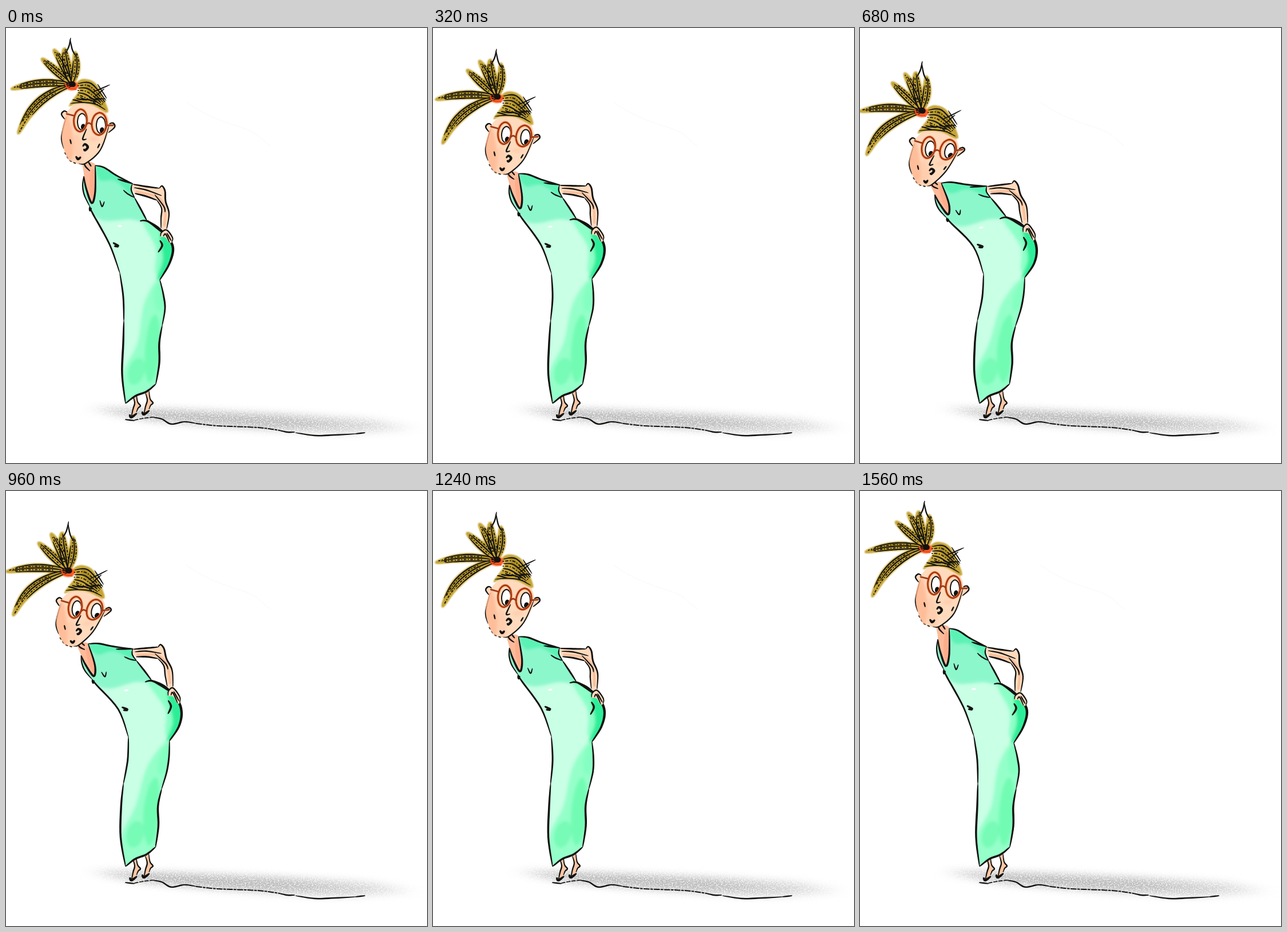
Write an HTML page that moves like this. It is 736 by 760 pixels and loops after 1.6 s.

```html
<!DOCTYPE html>
<html lang="en">
<head>
<meta charset="utf-8">
<title>Looking back</title>
<style>
html, body { margin: 0; width: 100%; height: 100%; overflow: hidden; background: #fff; }
svg { display: block; width: 100vw; height: 100vh; }
</style>
</head>
<body>
<svg viewBox="0 0 736 760" xmlns="http://www.w3.org/2000/svg">
  <defs>
    <filter id="grain" x="100" y="620" width="636" height="140" filterUnits="userSpaceOnUse" color-interpolation-filters="sRGB">
      <feGaussianBlur in="SourceGraphic" stdDeviation="16 7" result="soft"/>
      <feTurbulence type="fractalNoise" baseFrequency=".45" numOctaves="3" seed="4"/>
      <feColorMatrix values="0 0 0 0 0  0 0 0 0 0  0 0 0 0 0  2.2 0 0 0 -.3" result="noise"/>
      <feComposite in="soft" in2="noise" operator="in"/>
    </filter>
    <linearGradient id="dusk">
      <stop stop-color="#b2b2b2"/><stop offset=".6" stop-color="#b8b8b8"/><stop offset="1" stop-color="#e6e6e6"/>
    </linearGradient>
    <filter id="wash" x="-30%" y="-30%" width="160%" height="160%"><feGaussianBlur stdDeviation="2.5"/></filter>
    <filter id="tint" x="-30%" y="-30%" width="160%" height="160%"><feGaussianBlur stdDeviation="1"/></filter>
    <clipPath id="dressClip"></clipPath>
    <clipPath id="faceClip"></clipPath>
  </defs>
  <rect width="736" height="760" fill="#fff"/>
  <path d="M315 129C350 155 385 165 415 175S445 195 462 206" fill="none" stroke="#f8f8f8"/>
  <path d="M150 664L300 667L480 675L640 684L715 700L600 708L470 702L350 694L240 684Z" fill="url(#dusk)" filter="url(#grain)"/>
  <g id="ground"></g>
  <g id="legs"></g>
  <g id="neck"></g>
  <g id="dress"></g>
  <g clip-path="url(#dressClip)"><g id="shade" filter="url(#wash)"></g></g>
  <g id="folds"></g>
  <g id="arm"></g>
  <g id="face"></g>
  <g clip-path="url(#faceClip)"><g id="blush" filter="url(#wash)"></g></g>
  <g id="hair" filter="url(#tint)"></g>
  <g id="strands"></g>
  <g id="features"></g>
</svg>
<script>
const NS = 'http://www.w3.org/2000/svg';
const FRAME = 40, COUNT = 40, BLACK = '#131210';
const parts = [];

// x, y, dx, dy: how far key points of the body travel in the bow.
const anchors = [
  [112, 17, -4, 41], [25, 183, -10, 38], [185, 174, -8, 42], [122, 237, -9, 40],
  [155, 240, -14, 31], [135, 260, -5, 32], [214, 269, 0, 7], [274, 277, -3, -9],
  [149, 307, 4, 20], [191, 379, 18, 2], [291, 388, 17, -1], [236, 337, 10, -4],
  [283, 360, 14, -9], [269, 440, 19, -4], [199, 428, 17, 2], [278, 488, 4, 0],
  [206, 512, -1, 0], [203, 585, -4, 0], [265, 605, -1, 0], [209, 655, 0, 0], [255, 670, 0, 0]
];

// A thin-plate spline spreads that travel over every point.
function kernel(ax, ay, bx, by) {
  const q = ((ax - bx) ** 2 + (ay - by) ** 2) / 1e4;
  return q ? q * Math.log(q) : 0;
}
const basis = (x, y) => [...anchors.map(a => kernel(x, y, a[0], a[1])), 1, x / 100, y / 100];
function solve(m) {
  const n = m.length;
  for (let c = 0; c < n; c++) {
    let best = c;
    for (let r = c + 1; r < n; r++) if (Math.abs(m[r][c]) > Math.abs(m[best][c])) best = r;
    [m[c], m[best]] = [m[best], m[c]];
    for (let r = 0; r < n; r++) {
      if (r === c) continue;
      const f = m[r][c] / m[c][c];
      for (let k = c; k < m[r].length; k++) m[r][k] -= f * m[c][k];
    }
  }
  return m.map((row, i) => [row[n] / row[i], row[n + 1] / row[i]]);
}
const bases = anchors.map(a => basis(a[0], a[1]));
const weights = solve([
  ...anchors.map((a, i) => [...bases[i], a[2], a[3]]),
  ...[0, 1, 2].map(k => [...bases.map(b => b[anchors.length + k]), 0, 0, 0, 0, 0])
]);
function shift(x, y) {
  const b = basis(x, y);
  return [0, 1].map(i => b.reduce((sum, v, k) => sum + v * weights[k][i], 0));
}

let seed = 7;
const rand = () => (seed = seed * 16807 % 2147483647) / 2147483647;

// Catmull-Rom samples; a doubled point makes a corner.
function spline(a, b, c, d, t) {
  const bend = 2 * a - 5 * b + 4 * c - d;
  const twist = 3 * (b - c) + d - a;
  return b + .5 * t * (c - a + t * (bend + t * twist));
}
function curve(p, closed) {
  const n = p.length, out = [], last = closed ? n : n - 1, steps = 6;
  const at = i => closed ? p[(i + n) % n] : p[Math.max(0, Math.min(n - 1, i))];
  for (let i = 0; i < last; i++) {
    const [a, b, c, d] = [at(i - 1), at(i), at(i + 1), at(i + 2)];
    if (b[0] === c[0] && b[1] === c[1]) continue;
    for (let k = 0; k < steps; k++) {
      out.push([0, 1].map(j => spline(a[j], b[j], c[j], d[j], k / steps)));
    }
  }
  if (!closed) out.push(p[n - 1]);
  return out;
}
// A pen stroke, thin at both ends.
function brush(p, w) {
  const s = curve(p), n = s.length - 1, left = [], right = [];
  s.forEach(([x, y], i) => {
    const a = s[Math.max(0, i - 1)], b = s[Math.min(n, i + 1)];
    const dx = b[0] - a[0], dy = b[1] - a[1], len = Math.hypot(dx, dy) || 1;
    const h = w / 2 * (.35 + .65 * Math.max(0, Math.sin(Math.PI * i / n)) ** .6);
    left.push([x - dy / len * h, y + dx / len * h]);
    right.unshift([x + dy / len * h, y - dx / len * h]);
  });
  return left.concat(right);
}
const path = (p, end) => 'M' + p.map(q => q[0].toFixed(1) + ' ' + q[1].toFixed(1)).join('L') + end;
const parse = s => typeof s === 'string' ? s.split(' ').map(q => q.split(',').map(Number)) : s;

function add(layer, shape, attrs, build) {
  const el = document.createElementNS(NS, 'path');
  for (const k in attrs) el.setAttribute(k, attrs[k]);
  document.getElementById(layer).append(el);
  const pts = parse(shape);
  const move = pts.map(p => layer === 'ground' ? [0, 0] : shift(...p));
  parts.push({ el, pts, move, build });
}
const outline = p => path(curve(p, true), 'Z');
const fill = (layer, color, shape, opacity = 1) => add(layer, shape, { fill: color, opacity }, outline);
const hoop = (layer, w, color, shape, inside = 'none') =>
  add(layer, shape, { fill: inside, stroke: color, 'stroke-width': w }, outline);
const ink = (layer, w, ...shapes) => shapes.forEach(s =>
  add(layer, s, { fill: BLACK }, p => path(brush(p, w), 'Z')));
const line = (layer, w, color, shape, dash = 'none') =>
  add(layer, shape, { fill: 'none', stroke: color, 'stroke-width': w, 'stroke-dasharray': dash,
    'stroke-linecap': 'round' }, p => path(curve(p), ''));
const offset = (shape, dx, dy) => parse(shape).map(([x, y]) => [x + dx, y + dy]);
function oval(x, y, rx, ry, tilt = 0) {
  const c = Math.cos(tilt), s = Math.sin(tilt);
  return Array.from({ length: 8 }, (_, i) => {
    const u = rx * Math.cos(i * Math.PI / 4), v = ry * Math.sin(i * Math.PI / 4);
    return [x + u * c - v * s, y + u * s + v * c];
  });
}

// Ground line
ink('ground', 2.6, '208,684 225,686', '256,680 272,683 289,692 312,688 333,691', '478,703 492,706 505,706',
  '506,707 540,712 575,711 612,709', '611,709 628,707');
line('ground', 1.7, BLACK, '225,685 240,682 256,680', '6 3');
line('ground', 2, BLACK, '333,691 370,695 440,698 478,703', '9 3 3 3');

const skin = '#ffdabd', tan = '#fdc7a4';

// Legs
for (const [dx, dy] of [[0, 0], [22, -5]]) {
  const back = offset('228,639 230,653 235,660 231,664 228,671', dx, dy);
  const front = offset('219,680 222,666 225,655 222,643', dx, dy);
  fill('legs', tan, [...back, ...front]);
  ink('legs', 2.4, back, front);
  ink('legs', 4.5, offset('216,675 219,680 229,673', dx, dy));
}

// Neck
fill('neck', '#fdbb9a', '134,233 147,234 157,241 158,270 156,298 149,308 140,290 136,255');
fill('neck', '#ff9f7b', oval(152, 272, 6, 26), .5);
ink('neck', 2.6, '136,234 139,242 147,250', '144,234 149,242');

// Dress: the edges join into one outline and are inked one by one.
const shoulder = '156,240 172,244 192,257 221,272', cuff = '221,272 219,283 225,297';
const back = '225,297 236,317 246,336', hip = '246,336 266,349 286,370 292,388 285,413 269,440';
const rear = '269,440 275,465 278,490 273,520', skirt = '273,520 268,550 268,585 262,622';
const hem = '262,622 246,635 226,643 209,656', shin = '209,656 203,605 205,550 206,512';
const thigh = '206,512 205,470 199,428', belly = '199,428 181,378 152,325 146,311';
const strap = '146,311 137,292 134,275 136,259', collar = '136,259 140,280 150,306 156,285 156,240';
const gown = [shoulder, cuff, back, hip, rear, skirt, hem, shin, thigh, belly, strap, collar].join(' ');
fill('dressClip', '#000', gown);
fill('dress', '#c8ffe5', gown);
fill('shade', '#8df7cc', '130,240 190,240 228,280 250,336 215,334 165,335 138,300');
fill('shade', '#4df0ae', '160,238 222,266 226,298 192,268 164,266', .75);
fill('shade', '#86ffc4', '240,336 300,360 290,430 262,430 262,385', .9);
fill('shade', '#1cec90', '270,358 298,370 296,415 264,442 274,404', .85);
fill('shade', '#94ffc9', '268,440 285,490 268,625 205,655 206,600 230,550 242,480');
fill('shade', '#5cfba5', oval(256, 560, 13, 60, .08), .6);
fill('shade', '#5cf7a4', oval(228, 600, 14, 24, .3), .5);
fill('shade', '#7cffbd', oval(268, 470, 10, 26), .6);
fill('folds', '#f7fffb', oval(199, 346, 4, 2));

ink('folds', 2.4, cuff, strap, '205,283 213,290 224,296', '164,301 168,312 172,303');
ink('folds', 3, shoulder, back, rear, belly, thigh, '195,264 222,272', '234,337 248,338 272,357');
ink('folds', 3.6, collar, skirt, hem, shin, '146,313 147,319 149,314', '269,371 273,380 266,392');
ink('folds', 4.4, hip, '187,375 196,381 189,381');

// Arm and hand
const upper = '222,273 245,277 268,280', outer = '268,280 273,276 278,285 279,303 285,324 281,351';
const inner = '271,350 271,332 272,315 264,301', under = '264,301 245,294 225,289';
const fingers = '270,364 272,357 281,353 291,366 290,374';
fill('arm', skin, [upper, outer, inner, under].join(' '));
fill('arm', skin, fingers + ' 285,375 279,366');
line('arm', 4, '#f9bf9c', '228,286 266,296 278,318 277,345');
ink('arm', 3, upper, outer, under);
ink('arm', 2.4, inner, fingers, '224,279 245,283 272,293', '260,291 276,312 278,322', '275,364 279,360 286,375', '281,358 289,372');

// Head
const egg = '106,150 97,190 108,228 124,237 139,236 165,214 181,170 165,133 140,129 120,134';
const ears = ['108,148 102,145 97,151 104,161', '179,168 187,166 190,173 179,183'];
ears.forEach(e => { fill('face', skin, e); ink('face', 2.6, e); });
fill('face', skin, egg);
fill('faceClip', '#000', egg);
fill('blush', '#ffb790', oval(106, 190, 11, 46, -.1), .8);
fill('blush', '#ffc5a2', oval(126, 212, 9, 28, -.1), .55);
fill('blush', '#ffc5a2', oval(153, 194, 8, 4), .6);
ink('face', 2.2, '105,156 97,190 101,211', '127,237 140,236 165,213 180,171');
line('face', 1.8, BLACK, '103,218 111,231 123,237', '3 5');

// Hair: each lock grows out of the knot with a few strands along it.
const knot = [115, 99];
function lock(tx, ty, w, bow, strands) {
  const dx = tx - knot[0], dy = ty - knot[1], len = Math.hypot(dx, dy);
  const at = (t, side) => {
    const off = bow * 4 * t * (1 - t) + side * w * Math.sin(Math.PI * (.08 + .84 * t)) ** .7;
    return [knot[0] + dx * t - dy / len * off, knot[1] + dy * t + dx / len * off];
  };
  const run = (side, a, b) => [0, .25, .5, .75, 1].map(t => at(a + (b - a) * t, side));
  fill('hair', '#c5a436', [...run(-1, 0, 1), ...run(1, 1, 0)]);
  fill('hair', '#927611', [...run(.15, .1, .85), ...run(.75, .85, .1)], .5);
  for (let i = 0; i < strands; i++) {
    const side = 1.8 * (i + .5) / strands - .9;
    if (i % 2) line('strands', 1.8, BLACK, run(side, .25, .85 + rand() * .15), '.5 4 3 4');
    else ink('strands', 2.2, run(side, 0, .7 + rand() * .3));
  }
}
lock(22, 182, 9, 15, 5);
lock(11, 106, 8, 6, 5);
lock(63, 54, 8, 0, 4);
lock(84, 38, 8, 2, 4);
lock(102, 36, 9, -2, 4);
lock(121, 42, 8, 4, 4);
ink('strands', 2.4, '113,17 110,32 104,44', '112,20 116,38 122,49');

fill('hair', '#c5a436', '110,136 128,108 124,95 138,89 158,98 174,130 177,148 150,134 125,132');
fill('hair', '#927611', oval(152, 112, 22, 6, .9), .5);
for (let i = 0; i < 6; i++) {
  const top = [126, 97 + 4 * i], mid = [149 - 2 * i, 97 + 5 * i], end = [175 - 2 * i, 127 + 2 * i];
  if (i % 2) line('strands', 1.8, BLACK, [top, mid, end], '.5 4 4 4');
  else ink('strands', 2.2, [top, mid, end]);
}
for (let i = 0; i < 6; i++) {
  const x = 120 + 8 * i + rand() * 5, y = 122 + rand() * 8;
  ink('strands', 2.4, [[x - 7, y - 5 + rand() * 4], [x, y], [x + 12, y + 4 * rand()]]);
}
ink('strands', 2, '112,132 134,130 156,133 174,143', '150,113 166,106 182,99', '160,98 176,123', '155,120 172,106');
fill('hair', '#ff5a20', oval(115, 101, 12, 8));
fill('strands', BLACK, oval(116, 98, 6, 5, .4));
line('strands', 2.4, '#f04a14', '104,98 108,105 122,107');

// Glasses and eyes
for (const [x, y, r] of [[130, 161.5, 11.5], [163, 167.5, 13]]) {
  hoop('features', 2, BLACK, oval(x + 3, y + 2.5, 8, 14.5), '#fff');
  fill('features', BLACK, oval(x + 5, y + 11.5, 4, 5.5));
  hoop('features', 4, '#ee6a33', oval(x, y, r, 19.5, .06));
  hoop('features', 1.4, '#73290f', oval(x, y, r, 19.5, .06));
}
['141,168 145,166 150,169', '106,150 118,153', '175,170 187,170'].forEach(s => line('features', 2.8, '#9c3a18', s));
ink('features', 2.6, '141,176 134,194 141,194', '112,194 114,203', '164,202 160,210');
ink('features', 4.4, '134,207 138,203 143,208 138,214 136,211', '122,224 126,229 131,225');

function draw(k) {
  const bend = Math.min(k, COUNT - 1 - k) / 17;
  for (const { el, pts, move, build } of parts) {
    el.setAttribute('d', build(pts.map((p, i) => [p[0] + move[i][0] * bend, p[1] + move[i][1] * bend])));
  }
}
let start, shown = -1;
function tick(now) {
  if (start === undefined) start = now;
  const k = Math.floor((now - start) / FRAME + .01) % COUNT;
  if (k !== shown) draw(shown = k);
  requestAnimationFrame(tick);
}
draw(0);
requestAnimationFrame(tick);
</script>
</body>
</html>
```
